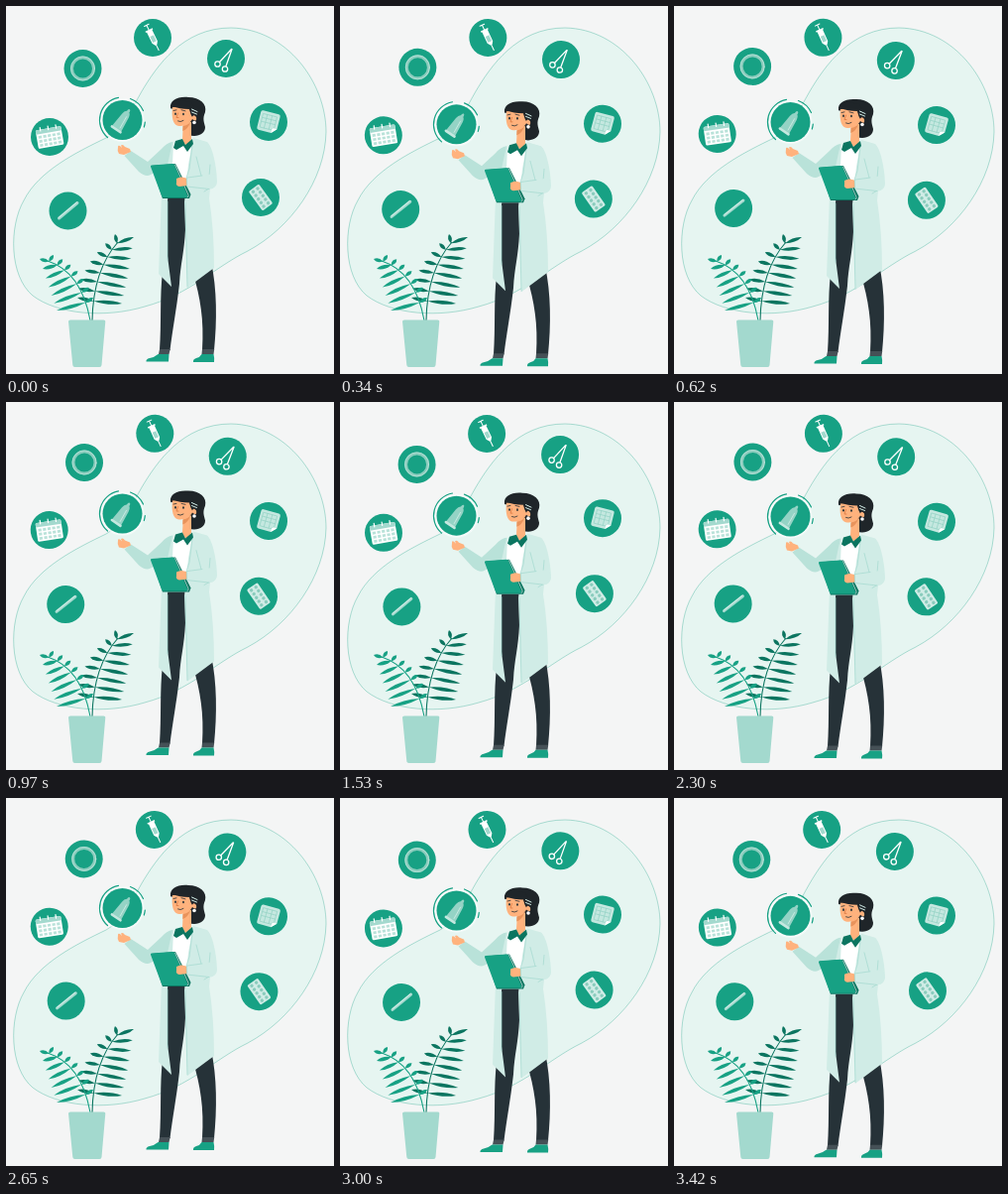
Recreate the animation shown at these times as an HTML page. Size 331 by 371 pixels, loop 3.5 s.

```html
<!DOCTYPE html>
<html lang="en">
<head>
<meta charset="utf-8">
<style>
html, body { margin: 0; width: 100%; height: 100%; overflow: hidden; background: #f4f5f5; }
svg { display: block; width: 100%; height: 100%; }
.teal { fill: #17a184; }
.deep { fill: #0b7560; }
.mint { fill: #a3d9ce; }
.coat { fill: #d0ece6; }
.sleeve { fill: #b9e2d9; }
.skin { fill: #ffb27d; }
.dark { fill: #263238; }
.hair { fill: #1f2529; }
.white { fill: #fff; }
.line { fill: none; stroke-linecap: round; stroke-linejoin: round; }
</style>
</head>
<body>
<svg viewBox="0 0 331 371">
  <path d="M137 86C152 61 178 22 227 22C284 23 323 78 323 127C322 176 287 224 244 247C211 263 185 291 140 303C100 315 52 311 27 292C3 272 3 222 18 196C33 166 72 147 101 133C119 123 126 105 137 86Z" fill="#e6f5f1" stroke="#17a184" stroke-width=".5" stroke-opacity=".65"/>

  <g id="plant">
    <path class="mint" d="M63 318Q63 316.500 65 316.500H98.500Q100.500 316.500 100.300 318L96.500 362Q96.300 364 94.500 364H69.500Q67.500 364 67.300 362Z"/>
  </g>

  <g id="orbit">
    <g transform="translate(148 32)">
      <circle class="teal" r="19"/>
      <g transform="rotate(-26)">
        <path class="line" stroke="#fff" d="M0 -14V-8M-2.500 -14H2.500M0 7V14"/>
        <path class="white" d="M-4 -9H4V-7.500H3V5L1 8H-1L-3 5V-7.500H-4Z"/>
        <path fill="#a3d9ce" d="M-2 -2H2V4.500H-2Z"/>
      </g>
    </g>
    <g transform="translate(222 53)">
      <circle class="teal" r="19"/>
      <g class="line" stroke="#fff" stroke-width="1.300">
        <path d="M-6.500 3.500L5.500 -9.500M0 7.500L6 -9.500"/>
        <circle cx="-8.500" cy="5.500" r="2.700"/><circle cx="-1" cy="10.500" r="2.700"/>
      </g>
    </g>
    <g transform="translate(265 117)">
      <circle class="teal" r="19"/>
      <g transform="rotate(14)">
        <path fill="#c5e8e0" d="M-8 -10H8Q10 -10 10 -8V5L5 10H-8Q-10 10 -10 8V-8Q-10 -10 -8 -10Z"/>
        <path class="line" stroke="#94d3c5" stroke-width=".7" d="M-7 -7H7V4L4 7H-7ZM-7 -3H7M-7 1H7M-3 -7V7M2 -7V7"/>
        <path class="white" d="M10 5H6.500Q5 5 5 6.500V10Z"/>
      </g>
    </g>
    <g transform="translate(257 193)">
      <circle class="teal" r="19"/>
      <g id="pills" transform="rotate(-36)"><rect class="coat" x="-6.500" y="-12" width="13" height="24" rx="1.500"/></g>
    </g>
    <g transform="translate(62.500 206.500)">
      <circle class="teal" r="19"/>
      <path class="line" stroke="#a3d9ce" stroke-width="3" d="M-9 7.500L9.500 -8"/>
      <path class="line" stroke="#e6f5f1" stroke-width=".8" d="M-9 6.800L9 -8.500"/>
    </g>
    <g transform="translate(44 132)">
      <circle class="teal" r="19"/>
      <g id="days" transform="rotate(-10)">
        <rect class="white" x="-13" y="-9" width="26" height="19" rx="1.500"/>
        <path class="mint" d="M-13 -4.500V-7.500Q-13 -9 -11.500 -9H11.500Q13 -9 13 -7.500V-4.500Z"/>
        <path class="line" stroke="#fff" stroke-width="1.200" d="M-8 -11V-7.500M0 -11V-7.500M8 -11V-7.500"/>
      </g>
    </g>
    <g transform="translate(77.500 63)">
      <circle class="teal" r="19"/>
      <g class="line">
        <circle r="11" stroke="#8accbd" stroke-width="3"/>
        <circle r="12" stroke="#c5e8e0" stroke-width=".7"/>
      </g>
    </g>
  </g>

  <g id="woman">
    <g transform="translate(117.500 115)">
      <circle r="22" fill="#fff" fill-opacity=".65"/>
      <circle class="teal" r="20"/>
      <path class="line" stroke="#17a184" stroke-width="1.200" d="M-4 -22.600A23 23 0 0 0 -15 17.500M8 -21.500A23 23 0 0 1 21 -9.500M22.800 2A23 23 0 0 1 21.800 7"/>
      <g transform="rotate(34)">
        <path fill="#94d3c5" d="M-5.500 11L-4 -5Q-3.500 -9 -1.500 -10Q-1.500 -13 0 -13Q1.500 -13 1.500 -10Q3.500 -9 4 -5L5.500 11Z"/>
        <rect x="-6.500" y="10" width="13" height="2.600" rx="1.300" fill="#c5e8e0"/>
        <path class="line" stroke="#d0ece6" stroke-width=".8" d="M1.500 -5L2.500 8"/>
      </g>
    </g>

    <path class="dark" d="M176 195H199L207 258C213 285 213 318 210 347H198C200 316 196 294 189 270Z"/>
    <path class="dark" d="M162 194H181V225C180 248 176 260 175 280C172 306 168 327 165.500 347H155C157 320 155 292 158 268Z"/>
    <path fill="#455056" d="M155 346H165.700L164.500 351H154ZM198 346H210.200L209.500 351H197.500Z"/>
    <path class="teal" d="M153.500 351H164.500L164 358.500H141.500Q141 356 145 355Q150 354 153.500 351ZM197.500 351H209.500Q210.500 355 210 359H189Q188.500 356 192 355Q196 354 197.500 351Z"/>

    <path class="white" d="M167 140L187 138L185 174H165Z"/>
    <path class="coat" d="M169 137C162 138 159 149 158 162L154 270L167 283L163 252V196L168 160Z"/>
    <path class="coat" d="M189 133L203 137C209 142 213 165 213 177Q213 183 206 184L205 194Q210 226 210 264L183 284L180 198L184 160Z"/>
    <path class="sleeve" d="M168 137Q162 138 157 144L143 157L126 146L119.500 151L134 167Q141 173 146 170L163 160Z"/>
    <path class="line" stroke="#a3d9ce" stroke-width=".7" d="M188 140L185 164L182 173M192 152L197 171M206 160L205 172M205 184L200 187M181 198L183 283M163 197V256"/>
    <path class="skin" d="M119 150L114 149Q112 146 113 142Q113 140 115 141L117 143L116 140.500Q118 139 120 142L125 144L126 147Z"/>

    <path class="hair" d="M166 103C165 95 173 91 184 92C196 92 203 99 201 107C198 114 200 117 201 122C201 129 193 133 184 130L180 108Z"/>
    <path class="skin" d="M179 116L178 134Q179 139 182 140Q186 138 187 134V117Z"/>
    <path class="skin" d="M168 102C167 110 168 117 171 119.500C176 123 185 120 188 114Q193 118 192 112Q190 109 188 111L184 101Z"/>
    <path fill="#e8935c" d="M178.500 121Q184 120 186 117Q184 124 178.300 126Z"/>
    <path class="hair" d="M166 104Q166 96 176 95L187 97Q192 104 188 112Q186 109 185 104Q175 104 168 101Z"/>
    <g class="line" stroke="#263238" stroke-width=".8">
      <path d="M169 105.500L172 104.800M177 104.800L181 105.800"/>
      <path stroke="#d97840" d="M173.500 108L172 112.500H174"/>
      <path d="M173.500 116Q176 117.500 179 115.500"/>
    </g>
    <ellipse class="dark" cx="171" cy="108.800" rx=".9" ry="1.300"/>
    <ellipse class="dark" cx="179" cy="109" rx=".9" ry="1.300"/>
    <circle class="white" cx="190" cy="117.500" r="1.800"/>
    <path class="line" stroke="#d0ece6" stroke-width="1" d="M187.500 104L193 106.500M187.500 107L192.500 109"/>

    <path class="deep" d="M171 136L178 134L181 140L188 134L189 139L183 147L179 141L172 145L169 143Z"/>
    <path class="deep" d="M147 161L171 159L186.500 190L185 194L158 194Z"/>
    <path class="teal" d="M146 162Q145.500 160.500 147 160.500L168 159Q169.500 159 170 160.500L183 191Q183.500 193 182 193H159Q157.500 193 157 191.500Z"/>
    <path class="line" stroke="#d0ece6" stroke-width=".7" d="M170.500 160L184 190.500Q184.500 192.500 183 193"/>
    <path class="skin" d="M172 174Q177 171 183 174V181L175 182Q171 181 172 178Z"/>
    <path class="coat" d="M182 173L198 171L211 169Q215 184 206 184.500L183 182Z"/>
    <path class="line" stroke="#a3d9ce" stroke-width=".7" d="M182.500 173V182L205 184.500M183 173L198 171"/>
  </g>
</svg>
<script>
const LOOP = 3500, PERIOD = 1560;
const $ = id => document.getElementById(id);

function add(parent, name, attrs) {
  const el = document.createElementNS('http://www.w3.org/2000/svg', name);
  for (const key in attrs) el.setAttribute(key, attrs[key]);
  parent.prepend(el);
  return el;
}
const mix = (a, b, t) => a + (b - a) * t;
const curve = ([a, b, c], t) => [0, 1].map(i => mix(mix(a[i], b[i], t), mix(b[i], c[i], t), t));

function leaf(x, y, [u, v], width, fill) {
  const dx = u - x, dy = v - y, len = Math.hypot(dx, dy);
  const nx = -dy / len * width, ny = dx / len * width;
  const cx = x + dx * .55, cy = y + dy * .55;
  add($('plant'), 'path', { fill, d: `M${x} ${y}Q${cx + nx} ${cy + ny} ${u} ${v}Q${cx - nx} ${cy - ny} ${x} ${y}` });
}

// Leaf tips follow one curve on each side of the stem.
function frond(stem, left, right, count, fill) {
  const [a, b, c] = stem;
  for (let i = 0; i < count; i++) {
    const t = i / (count - 1), [x, y] = curve(stem, .2 + .78 * t);
    leaf(x, y, curve(left, t), 3.7, fill);
    leaf(x, y, curve(right, t), 3.7, fill);
  }
  add($('plant'), 'path', { d: `M${a}Q${b} ${c}`, fill: 'none', stroke: fill, 'stroke-width': 1.1 });
}
frond([[85, 317], [76, 268], [42, 257]], [[51, 307], [43, 286], [34, 255]], [[88, 294], [77, 262], [48, 251]], 7, '#17a184');
frond([[87, 317], [88, 266], [113, 238]], [[72, 294], [73, 262], [110, 230]], [[117, 300], [125, 273], [129, 233]], 8, '#0b7560');

for (let row = 0; row < 5; row++) {
  for (let col = 0; col < 2; col++)
    $('pills').append(add($('pills'), 'circle', { cx: col * 5.6 - 2.8, cy: row * 4.5 - 9, r: 1.7, fill: '#8accbd' }));
  if (row < 3) for (let col = 0; col < 5; col++)
    $('days').append(add($('days'), 'rect', { x: col * 4.7 - 11, y: row * 4.2 - 2.8, width: 3.2, height: 2.7, fill: '#b9e2d9' }));
}

const wave = p => 1 - 4 * Math.abs((p + .25) % 1 - .5);

function draw(now) {
  const p = now % LOOP / PERIOD;
  $('orbit').setAttribute('transform', `rotate(${1 + wave(p + .75)} 154.5 119.5)`);
  $('woman').setAttribute('transform', `translate(0 ${5 * wave(p)})`);
  requestAnimationFrame(draw);
}
const start = performance.now();
requestAnimationFrame(() => draw(0));
draw = (step => () => step(performance.now() - start))(draw);
</script>
</body>
</html>
```
